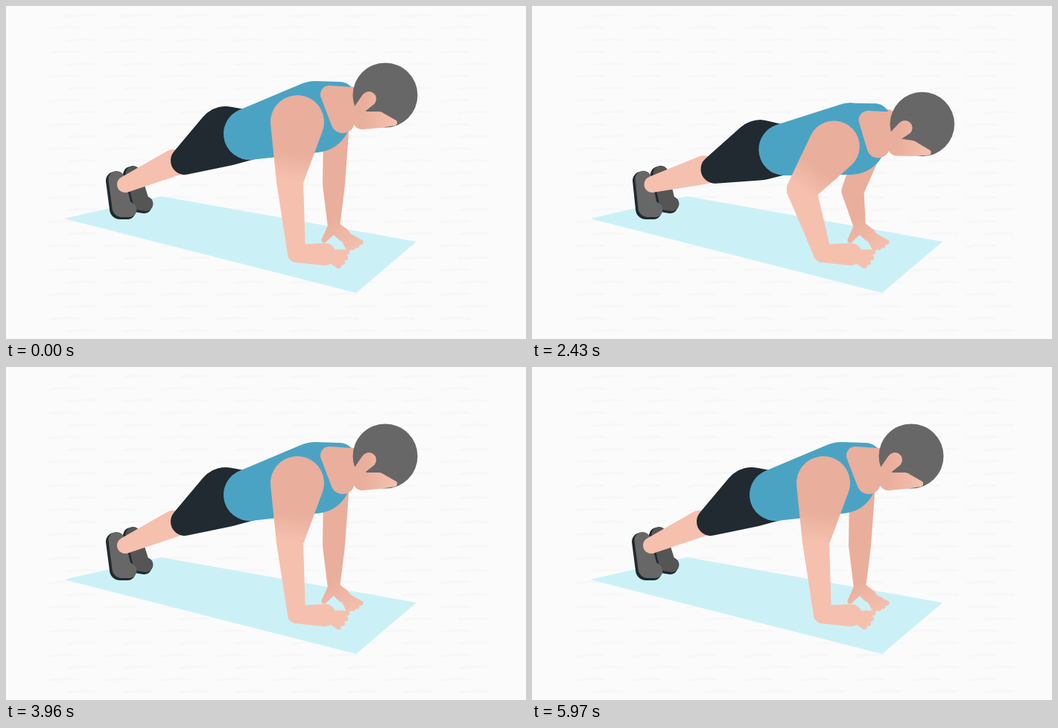
These frames come from a looping animation (698 by 448 pixels, 6000 ms). An HTML page with a canvas:

```html
<!DOCTYPE html>
<html lang="en">
<head>
<meta charset="utf-8">
<title>Push-up</title>
<style>
html, body { margin: 0; width: 100%; height: 100%; overflow: hidden; background: #fbfbfb; }
canvas { display: block; }
</style>
</head>
<body>
<canvas id="stage" width="698" height="448"></canvas>
<script>
const ctx = document.getElementById('stage').getContext('2d');
const SKIN = '#f5c0ae', SHADE = '#e9ae9c', DARK = '#202a30', SHIRT = '#4ba3c4', HAIR = '#676767';
const PAPER = '#fbfbfb', MAT = '#cbf1f7', GRAIN = '#f7f7f7', FAR_SHOE = '#555555';

const clamp = v => Math.max(0, Math.min(1, v));
const mix = (a, b, s) => a + (b - a) * s;
const ease = (t, from, to) => {
  const u = clamp((t - from) / (to - from));
  return u * u * (3 - 2 * u);
};

// How far the body is lowered: 0 = arms straight, 1 = chest at the mat
let s = 0;

// A joint is a circle moving from its raised to its lowered place along a shallow arc
function joint(up, down = up, arc = 8 * clamp((up[0] - 190) / 110)) {
  const [x, y, r] = up.map((v, i) => mix(v, down[i], s));
  return { x: x + 4 * s * (1 - s) * arc, y, r };
}
const fixed = (x, y, r) => ({ x, y, r });

// Adds the outline around two circles to the path
function limb(a, b) {
  const dx = b.x - a.x, dy = b.y - a.y;
  const ratio = (a.r - b.r) / (Math.hypot(dx, dy) || 1);
  const k = Math.acos(Math.max(-1, Math.min(1, ratio)));
  const dir = Math.atan2(dy, dx);
  const start = dir + k;
  ctx.moveTo(a.x + a.r * Math.cos(start), a.y + a.r * Math.sin(start));
  ctx.arc(a.x, a.y, a.r, start, dir - k + 2 * Math.PI);
  ctx.arc(b.x, b.y, b.r, dir - k, start);
  ctx.closePath();
}

function chain(color, ...joints) {
  ctx.fillStyle = color;
  ctx.beginPath();
  joints.forEach((j, i) => limb(j, joints[i + 1] || j));
  ctx.fill();
}

// Skin fading from shaded to light between two joints
function skin(a, b, from = 0) {
  const g = ctx.createLinearGradient(a.x, a.y, b.x, b.y);
  g.addColorStop(from, SHADE);
  g.addColorStop(1, SKIN);
  return g;
}

function hand(color, wrist, palm, angle, length) {
  chain(color, wrist, palm);
  for (let i = 0; i < 4; i++) {
    const a = angle + i * 0.27, reach = length - 2 * i;
    chain(color, fixed(palm.x, palm.y, 6),
      fixed(palm.x + reach * Math.cos(a), palm.y + reach * Math.sin(a), 3.5));
  }
}

function shoe(color, ...joints) {
  chain(DARK, ...joints);
  chain(color, ...joints.map(({ x, y, r }) => fixed(x + 2.5, y - 2, r - 1)));
}

function background() {
  ctx.fillStyle = PAPER;
  ctx.fillRect(0, 0, 698, 448);
  ctx.strokeStyle = GRAIN;
  ctx.lineWidth = 3;
  ctx.beginPath();
  for (let row = 0; row < 27; row++) {
    for (let x = row % 2 ? 58 : 82; x < 640; x += 75) {
      const y = 13 + row * 16.3;
      ctx.moveTo(x, y + 1);
      ctx.quadraticCurveTo(x + 20, y - 2, x + 40, y);
    }
  }
  ctx.stroke();
  ctx.fillStyle = MAT;
  ctx.beginPath();
  [[78, 286], [208, 256], [551, 317], [470, 386]].forEach(p => ctx.lineTo(...p));
  ctx.fill();
}

function farSide() {
  shoe(FAR_SHOE, joint([168, 227, 11], [177, 227, 12]), fixed(179, 266, 12), fixed(185, 268, 11));
  chain(SHADE, joint([172, 236, 10], [185, 231, 10]), joint([225, 211, 15], [255, 236, 16]));

  const wrist = fixed(440, 297, 8), palm = fixed(453, 308, 9);
  const color = skin(fixed(440, 285), fixed(468, 330));
  chain(color, joint([443, 170, 17], [450, 280, 17]), joint([440, 240, 15], [420, 275, 15], -6), wrist);
  chain(color, wrist, fixed(427, 315, 3.5));
  hand(color, wrist, palm, 0.4, 25);
}

function body() {
  shoe(HAIR, joint([146, 235, 12], [150, 234, 12]), fixed(153, 273, 14), fixed(163, 276, 11));
  chain(SKIN, joint([160, 240, 11], [166, 240, 11]), joint([225, 211, 18], [240, 249, 23]));
  chain(DARK, joint([240, 208, 19], [252, 254, 20]), joint([295, 175, 40], [318, 250, 42]),
    joint([322, 174, 34], [345, 252, 34]));
  chain(SHADE, joint([462, 118, 10], [498, 245, 14]), joint([490, 140, 14], [510, 280, 14]));
  chain(SHIRT, joint([327, 172, 35], [352, 256, 35]), joint([415, 149, 48], [442, 267, 49]),
    joint([448, 122, 20], [472, 240, 22]));

  const collar = joint([434, 119, 12], [478, 256, 14]);
  chain(SHADE, collar, joint([452, 155, 16], [479, 290, 14]), joint([462, 121, 12], [495, 253, 12]), collar);
}

function head() {
  chain(HAIR, joint([509, 120, 43.5], [544, 275.5, 42.5]));
  const chin = joint([478, 154, 12], [500, 296, 11]);
  const brow = joint([521, 157, 4], [540, 316, 3]);
  chain(skin(chin, brow), joint([487, 125, 10], [517, 280, 10]), joint([473, 140, 7], [500, 284, 10]),
    chin, joint([500, 153, 11], [514, 306, 9]), brow);
}

function nearArm() {
  const shoulder = joint([391, 156, 36], [424, 287, 30]);
  const elbow = joint([381, 235, 18], [352, 282, 25], -16);
  const wrist = fixed(390, 333, 12);
  chain(SKIN, elbow, wrist);
  hand(SKIN, wrist, fixed(428, 334, 15), -0.1, 30);
  chain(skin(shoulder, elbow, 0.5), shoulder, elbow);
}

function tick(now) {
  const step = Math.floor(now % 6000 / 30) * 30;
  const t = Math.max(0, step - 30) % 1980;
  s = ease(t, 155, 965) - ease(t, 1183, 1863);
  background();
  farSide();
  body();
  head();
  nearArm();
  requestAnimationFrame(tick);
}
requestAnimationFrame(tick);
</script>
</body>
</html>
```
